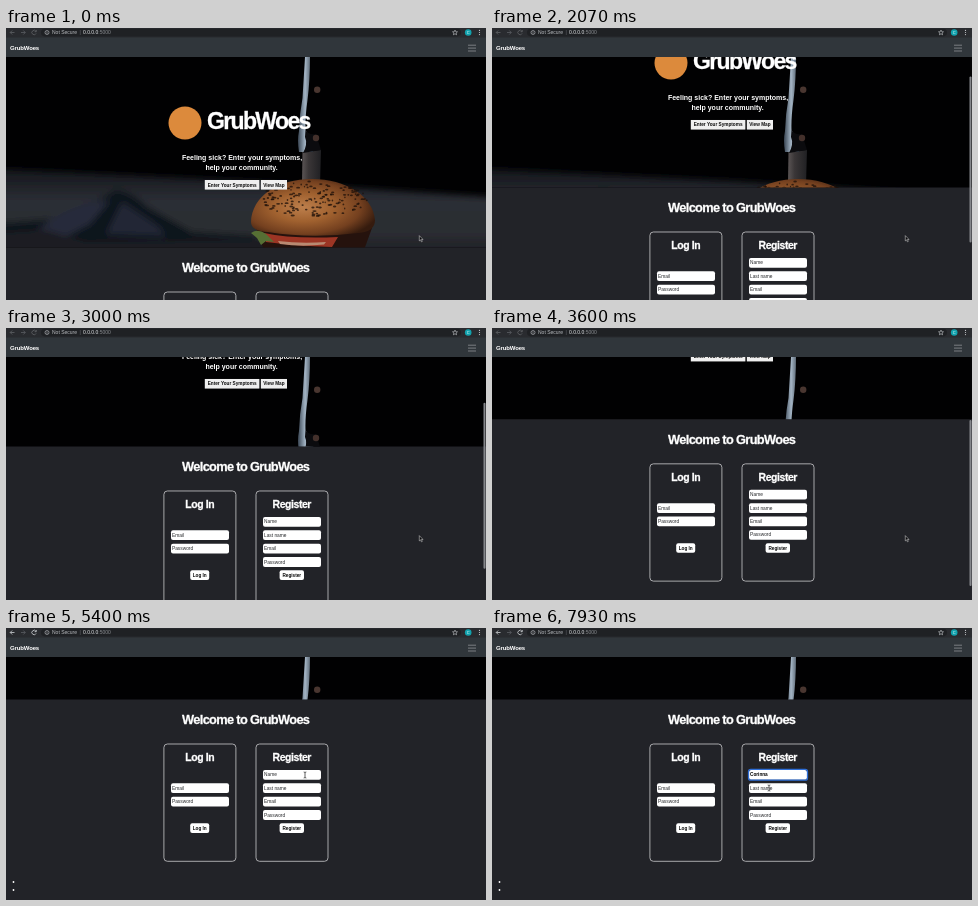
An HTML page that plays this animation: 480x272 px, repeating every 8 s.

```html
<!DOCTYPE html>
<html lang="en">
<head>
<meta charset="utf-8">
<title>GrubWoes</title>
<style>
  html, body { margin: 0; width: 100%; height: 100%; overflow: hidden; background: #222328; }
  svg { display: block; width: 100vw; height: 100vh; font-family: "Liberation Sans", Arial, sans-serif; }
  text { white-space: pre; }
  .b { font-weight: 700; }
  .w { fill: #fff; }
  .mid { text-anchor: middle; }
  .heavy { stroke: #fff; stroke-width: .3; }
  .btn { font-size: 4.7px; font-weight: 700; text-anchor: middle; fill: #0c0c0c; }
  .hint { font-size: 4.8px; fill: #26282b; }
  .url { font-size: 5px; }
</style>
</head>
<body>
<svg viewBox="0 0 480 272" xmlns="http://www.w3.org/2000/svg">
  <defs>
    <clipPath id="heroClip"><rect id="heroBox" y="29" width="480" height="190.5"/></clipPath>
    <filter id="soft" x="-30%" y="-50%" width="160%" height="200%"><feGaussianBlur stdDeviation="3"/></filter>
    <filter id="fine" x="-20%" y="-20%" width="140%" height="140%"><feGaussianBlur stdDeviation=".7"/></filter>
    <linearGradient id="table" x1="0" y1="0" x2="0" y2="1">
      <stop offset="0" stop-color="#14161b"/><stop offset=".35" stop-color="#2a2d34"/>
      <stop offset=".7" stop-color="#2b2d33"/><stop offset="1" stop-color="#1b1c20"/>
    </linearGradient>
    <radialGradient id="bun" cx=".42" cy=".5" r=".62">
      <stop offset="0" stop-color="#bd7f4c"/><stop offset=".4" stop-color="#a0612f"/>
      <stop offset=".75" stop-color="#74401f"/><stop offset="1" stop-color="#351b0e"/>
    </radialGradient>
    <linearGradient id="steel">
      <stop offset="0" stop-color="#5b5555"/><stop offset=".35" stop-color="#3a3637"/><stop offset="1" stop-color="#202023"/>
    </linearGradient>
    <linearGradient id="edge">
      <stop offset="0" stop-color="#3a4654"/><stop offset=".45" stop-color="#a3b4c4"/><stop offset="1" stop-color="#2a343f"/>
    </linearGradient>
  </defs>

  <rect width="480" height="272" fill="#222328"/>

  <g clip-path="url(#heroClip)">
    <rect y="29" width="480" height="191" fill="#010102"/>
    <g filter="url(#soft)">
      <path d="M-20 140 L240 153 L500 170 V232 H-20Z" fill="url(#table)"/>
      <path d="M-20 196 L60 190 L110 162 Q130 166 140 178 L186 204 L250 208 V232 H-20Z" fill="#11131a"/>
      <path d="M30 204 Q60 176 104 172 L84 196 L50 214Z" fill="#252b3a"/>
      <path d="M100 206 L116 174 L152 198 L160 208Z" fill="#202534"/>
      <path d="M-20 206 L40 202 L80 214 L260 212 V232 H-20Z" fill="#1a1b20"/>
    </g>
    <path d="M296.500 124 L315 122 L314 157 L296 157Z" fill="url(#steel)"/>
    <path d="M299 29 H304 Q304 52 301.500 72 Q299 90 299.500 102 Q302 108 308 109 L307 124 L293 124 Q291 112 293 103 Q293.500 86 296.500 70Z" fill="url(#edge)" filter="url(#fine)"/>
    <path d="M299.500 102 Q302 107 310 106 L315 122 L297 125 Q302 116 299 109Z" fill="#0b0b0e"/>
    <circle cx="311.200" cy="61.800" r="3.200" fill="#493630"/>
    <circle cx="310" cy="110" r="3.200" fill="#43302b"/>
    <path d="M250 200 H366 L358 222 H258Z" fill="#25120d"/>
    <path d="M258 205 Q285 211 332 209 L326 219 Q290 218 260 214Z" fill="#9c3524"/>
    <path d="M272 213 Q295 216 320 214 L318 216.500 Q295 219 274 216Z" fill="#b98a72"/>
    <path d="M245 205 Q252 200 260 206 L268 214 L260 213 L255 217 L251 210Z" fill="#566f34"/>
    <path d="M245 194 C246 168 272 151 306 151 C340 151 367 168 369 192 Q369 204 352 205 Q305 211 262 204 Q245 203 245 194Z" fill="url(#bun)" filter="url(#fine)"/>
    <g id="seeds" fill="#1c0f09"></g>
  </g>

  <g id="page">
    <circle cx="179" cy="95" r="16.500" fill="#dc8a3c"/>
    <text class="b w heavy" x="201" y="101.400" font-size="23" letter-spacing="-1.650">GrubWoes</text>
    <g class="b w mid" font-size="7">
      <text x="236" y="132.300">Feeling sick? Enter your symptoms,</text>
      <text x="235.500" y="141.800">help your community.</text>
    </g>
    <text class="b w mid heavy" x="239.700" y="244" font-size="12.800" letter-spacing="-.65">Welcome to GrubWoes</text>
    <g id="form"></g>
    <circle class="w" cx="7.500" cy="402" r=".9"/>
    <circle class="w" cx="7.500" cy="410" r=".9"/>
  </g>

  <rect width="480" height="29" fill="#30363b"/>
  <text class="b w" x="4" y="22.200" font-size="6" letter-spacing="-.15">GrubWoes</text>
  <path d="M462 17.200h8M462 20.100h8M462 23h8" stroke="#8d9195" stroke-width=".8"/>
  <rect id="thumb" x="477.500" width="2" height="166" rx="1" fill="#85878b"/>

  <rect width="480" height="9.500" fill="#292b2f"/>
  <rect x="35" y=".8" width="420" height="7.600" rx="3.800" fill="#1f2124"/>
  <g fill="none" stroke-width=".8">
    <g id="nav" stroke="#d0d3d6">
      <path d="M8.500 4.500H4.300M6.200 2.500L4.200 4.500L6.200 6.500"/>
      <path d="M30 3.400A2.200 2.200 0 1 0 30.100 5.400M30.300 2V3.700H28.600"/>
    </g>
    <path d="M15 4.500H19.200M17.300 2.500L19.300 4.500L17.300 6.500" stroke="#5b5e62"/>
    <circle cx="41" cy="4.500" r="2" stroke="#bfc2c6" stroke-width=".6"/>
    <path d="M41 4.200V5.700M41 3.200V3.700" stroke="#bfc2c6" stroke-width=".6"/>
    <path d="M74.300 2V7" stroke="#606368" stroke-width=".5"/>
    <path d="M449 2l.7 1.700 1.800.1-1.400 1.200.5 1.800-1.600-1-1.600 1 .5-1.800-1.400-1.200 1.800-.1z" stroke="#c3c6ca" stroke-width=".6"/>
  </g>
  <text class="url" x="46" y="6.200" fill="#b9bcc0">Not Secure</text>
  <text class="url" x="77" y="6.200" fill="#e8eaed">0.0.0.0<tspan fill="#8d9094">:5000</tspan></text>
  <circle cx="462.200" cy="4.500" r="3.300" fill="#12a3ae"/>
  <text class="mid w" x="462.200" y="6" font-size="4">C</text>
  <g fill="#c3c6ca"><circle cx="473.500" cy="2.400" r=".6"/><circle cx="473.500" cy="4.500" r=".6"/><circle cx="473.500" cy="6.600" r=".6"/></g>

  <path id="arrow" d="M0 0V5.300L1.200 4.200L2.100 6.200L3 5.800L2.100 3.900H3.700Z" fill="#08080a" stroke="#e4e4e4" stroke-width=".5"/>
  <path id="beam" d="M-1.300 -3Q0 -3 0 -2.300Q0 -3 1.300 -3M0 -2.300V2.300M-1.300 3Q0 3 0 2.300Q0 3 1.300 3" fill="none" stroke="#1a1a1a" stroke-width=".7"/>
</svg>

<script>
const LOOP = 8000, MAX_SCROLL = 148, NAME = "Corinna";
const $ = id => document.getElementById(id);

const SCROLL = [[1440, 0], [1600, 6], [1760, 28], [1900, 48], [2070, 60], [2270, 63],
  [2620, 63], [2750, 72], [2870, 88], [3000, 101], [3200, 106],
  [3420, 106], [3540, 118], [3660, 138], [3760, 146], [3870, MAX_SCROLL]];
const MOUSE = [[4130, 413.3, 207.6], [4200, 399.2, 203.2], [4500, 340, 172], [4800, 300.5, 149.5],
  [5330, 300.5, 149.5], [5400, 299, 147], [7560, 299, 147], [7750, 288, 153], [7930, 277, 160]];
const KEYS = [6200, 6400, 6600, 6780, 6960, 7130, 7330];
const FOCUS = 5730;

// Linear interpolation over [time, ...values] rows
function at(rows, t) {
  const i = rows.findIndex(r => r[0] > t);
  if (i === 0) return rows[0].slice(1);
  if (i < 0) return rows[rows.length - 1].slice(1);
  const a = rows[i - 1], b = rows[i], k = (t - a[0]) / (b[0] - a[0]);
  return a.slice(1).map((v, j) => v + (b[j + 1] - v) * k);
}
const ramp = (t, a, b) => Math.min(1, Math.max(0, (t - a) / (b - a)));
const show = (el, on) => el.setAttribute("opacity", +on);
const move = (el, x, y) => el.setAttribute("transform", `translate(${x} ${y})`);

const fields = [];
function field(x, y, label, id = "") {
  fields.push([x, y]);
  return `<rect x="${x}" y="${y}" width="58" height="9.8" rx="2" fill="#fff"/>
    <text class="hint" id="${id}" x="${x + 1}" y="${y + 6.5}">${label}</text>`;
}
function button(x, y, w, label, r = 2, fill = "#fff") {
  return `<rect x="${x}" y="${y}" width="${w}" height="9.6" rx="${r}" fill="${fill}"/>
    <text class="btn" x="${x + w / 2}" y="${y + 6.5}">${label}</text>`;
}
function card(x, title) {
  return `<rect x="${x}" y="264" width="72" height="117.300" rx="3.500" fill="none" stroke="#c9cacc" stroke-width=".8"/>
    <text class="b w mid heavy" x="${x + 35.8}" y="281.300" font-size="10.400" letter-spacing="-.4">${title}</text>`;
}
const row = i => 289.9 + i * 13.4;

$("form").innerHTML =
  button(198.8, 152, 54.6, "Enter Your Symptoms", 0, "#efefef") +
  button(254.8, 152, 26.2, "View Map", 0, "#efefef") +
  card(157.9, "Log In") + field(165, row(1), "Email") + field(165, row(2), "Password") +
  button(184.2, 343.3, 19, "Log In") +
  card(250, "Register") + field(257, row(0), "Name", "name") +
  ["Last name", "Email", "Password"].map((s, i) => field(257, row(i + 1), s)).join("") +
  button(273.6, 343.3, 24.4, "Register") +
  `<rect id="ring" x="256.500" y="${row(0) - .5}" width="59" height="10.800" rx="2.300" fill="none" stroke="#2f6fd8" stroke-width="1.300"/>
   <text id="typed" class="b" x="258" y="${row(0) + 6.5}" font-size="4.700" fill="#000"></text>
   <rect id="caret" y="${row(0) + 2}" width=".6" height="5.800" fill="#000"/>`;

// Poppy seeds, denser toward the top of the bun
let seed = 7;
const rnd = () => (seed = seed * 16807 % 2147483647) / 2147483647;
let dots = "";
for (let i = 0; i < 150; i++) {
  const a = rnd() * Math.PI * 2, r = Math.sqrt(rnd());
  const x = 307 + Math.cos(a) * r * 54, y = 171 + Math.sin(a) * r * 18;
  dots += `<ellipse cx="${x.toFixed(1)}" cy="${y.toFixed(1)}" rx="${(.7 + rnd() * 1.4).toFixed(1)}" ry=".9" opacity=".75"/>`;
}
$("seeds").innerHTML = dots;

const el = {};
for (const id of ["heroBox", "page", "thumb", "nav", "arrow", "beam", "name", "ring", "typed", "caret"]) el[id] = $(id);

function draw(t) {
  const [scroll] = at(SCROLL, t);
  move(el.page, 0, -scroll);
  el.heroBox.setAttribute("height", 190.5 - scroll);
  move(el.thumb, 0, 10 + scroll * .64);
  show(el.thumb, ramp(t, 1440, 1500) * (1 - ramp(t, 4350, 4700)));
  show(el.nav, t < 4700 ? .32 : t < 5070 ? .65 : 1);

  const count = KEYS.filter(k => t >= k).length;
  el.typed.textContent = NAME.slice(0, count);
  show(el.name, !count);
  show(el.ring, t >= FOCUS);
  const since = t - (count ? KEYS[count - 1] : FOCUS);
  show(el.caret, t >= FOCUS && since % 1000 < 500);
  el.caret.setAttribute("x", 258 + (count ? el.typed.getComputedTextLength() + .2 : -.3));

  const [x, y] = at(MOUSE, t);
  const over = fields.some(([fx, fy]) =>
    x > fx && x < fx + 58 && y > fy - scroll && y < fy - scroll + 9.8);
  const hidden = t >= 6400 && t < 7560;
  show(el.arrow, !over && !hidden);
  show(el.beam, over && !hidden);
  move(el.arrow, x, y);
  move(el.beam, x, y);
}
function tick() {
  draw(performance.now() % LOOP);
  requestAnimationFrame(tick);
}
tick();
</script>
</body>
</html>
```
